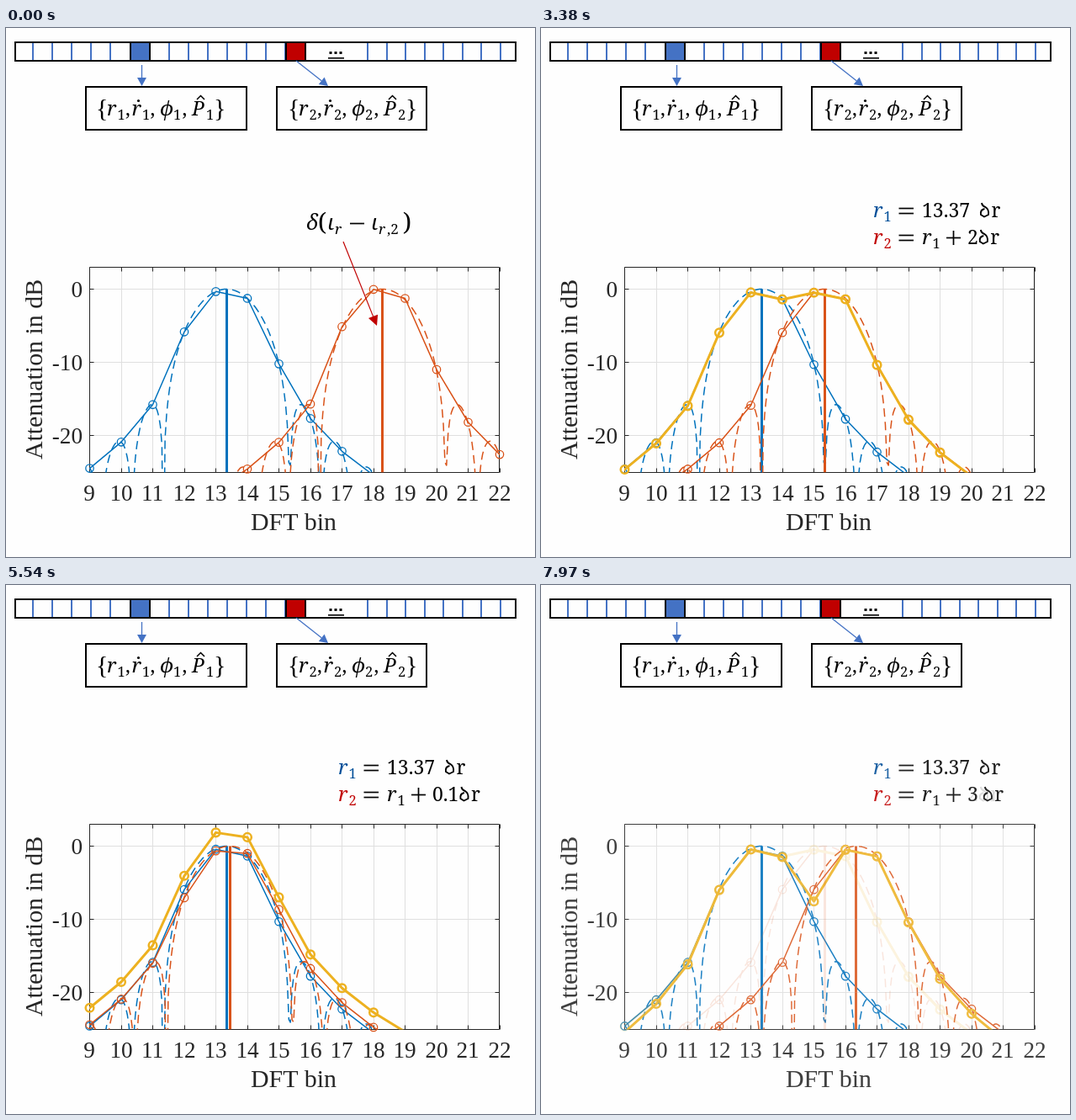
An HTML page with a canvas that plays this animation: 629x629 px, repeating every 8000 ms.

```html
<!DOCTYPE html>
<html lang="en">
<head>
<meta charset="utf-8">
<title>Two spectral peaks moving together</title>
<style>
html, body { margin: 0; width: 100%; height: 100%; overflow: hidden; background: #fefefe; }
canvas { display: block; }
</style>
</head>
<body>
<canvas id="stage" width="629" height="629"></canvas>
<script>
const SIZE = 629, LOOP = 8000, STEP = 30;
const BLUE = '#0072bd', ORANGE = '#d95319', GOLD = '#edb120', INK = '#262626';
const CELL_BLUE = '#4472c4', RED = '#c00000', NAVY = '#004e98';
const MATH = '"Noto Serif", Cambria, serif';
const TIMES = '"Liberation Serif", "Times New Roman", serif';
const LEFT = 99.5, RIGHT = 586.5, TOP = 284.5, BOTTOM = 528.5;
const F1 = 13.34;

// a, b: peak position and gain in dB; cos: cosine of the phase between them
const apart = { a: [F1, 0], b: [18.29, 0.2], cos: 1 };
const close = (gap, cos, space = 0) =>
  ({ a: [F1, -0.1], b: [F1 + Number(gap), -0.1], cos, gap, space });
const scenes = [
  { ...apart, delta: true },
  apart,
  close('3', -0.9, 5),
  close('2', -0.2),
  close('1', 0.67),
  close('0.5', 0.94),
  close('0.1', 0.5),
  close('0.05', -0.28)
];

// start time, fade steps, scene, even blend
const cues = [
  [0, 0, 0], [500, 0, 1], [2450, 7, 2], [3140, 8, 3], [3860, 8, 4], [4580, 8, 5],
  [5300, 8, 6], [6020, 8, 7], [6740, 8, 7], [7220, 8, 2, true], [7940, 8, 3]
];

const px = bin => LEFT + (bin - 9) * 37.5;
const py = db => 310.5 - db * 8.72;
const snap = v => Math.floor(v) + 0.5;
const toDb = v => 10 * Math.log10(Math.max(v, 1e-6));

// Hann window spectrum
function hann(x) {
  if (Math.abs(x) < 1e-6) return 1;
  if (Math.abs(Math.abs(x) - 1) < 1e-6) return 0.5;
  return Math.abs(Math.sin(Math.PI * x) / (Math.PI * x * (1 - x * x)));
}

const response = (bin, [f, gain]) => hann(bin - f) * 10 ** (gain / 10);

function layer(draw) {
  const c = document.createElement('canvas');
  c.width = c.height = SIZE;
  draw(c.getContext('2d'));
  return c;
}

function line(g, pts, color, width) {
  g.beginPath();
  pts.forEach(p => g.lineTo(p[0], p[1]));
  g.strokeStyle = color;
  g.lineWidth = width;
  g.stroke();
}

function text(g, str, x, y, size, color = '#000', style = '', family = MATH) {
  g.font = `${style} ${size}px ${family}`;
  g.fillStyle = color;
  g.fillText(str, x, y);
}

const italic = (g, str, x, y, size = 24, color = '#000') => text(g, str, x, y, size, color, 'italic');
const bracket = (g, str, x, y) => text(g, str, x, y, 30, '#000', '', TIMES);
const bar = (g, x, y, width) => line(g, [[x, y], [x + width, y]], '#000', 1.7);

function equals(g, x, y) {
  bar(g, x, y - 10.5, 17.5);
  bar(g, x, y - 4.5, 17.5);
}

function plus(g, x, y) {
  bar(g, x, y - 7.5, 17);
  line(g, [[x + 8.5, y - 16], [x + 8.5, y + 1]], '#000', 1.7);
}

function sub(g, letter, index, x, y, color) {
  italic(g, letter, x, y, 24, color);
  text(g, index, x + 12.5, y + 5, 16.5, color);
}

function arrow(g, x1, y1, x2, y2, color, width, len, half) {
  const a = Math.atan2(y2 - y1, x2 - x1);
  const bx = x2 - len * Math.cos(a), by = y2 - len * Math.sin(a);
  line(g, [[x1, y1], [bx, by]], color, width);
  g.beginPath();
  g.moveTo(x2, y2);
  g.lineTo(bx - half * Math.sin(a), by + half * Math.cos(a));
  g.lineTo(bx + half * Math.sin(a), by - half * Math.cos(a));
  g.fillStyle = color;
  g.fill();
}

// Blackletter d followed by r
function unit(g, x, y) {
  g.save();
  g.translate(x, y);
  g.beginPath();
  g.moveTo(3, -17);
  g.quadraticCurveTo(3.5, -13.5, 7.5, -12);
  g.quadraticCurveTo(12, -9, 11, -3);
  g.lineTo(6, -0.5);
  g.lineTo(2, -3);
  g.quadraticCurveTo(1, -9, 6.5, -10);
  g.strokeStyle = '#000';
  g.lineWidth = 1.9;
  g.stroke();
  g.restore();
  text(g, 'r', x + 14.5, y, 23);
}

function axes(g) {
  const bins = Array.from({ length: 14 }, (_, i) => i + 9);
  const levels = [0, -10, -20];
  bins.forEach(b => line(g, [[snap(px(b)), TOP], [snap(px(b)), BOTTOM]], '#dfdfdf', 1));
  levels.forEach(v => line(g, [[LEFT, snap(py(v))], [RIGHT, snap(py(v))]], '#dfdfdf', 1));
  g.strokeStyle = INK;
  g.lineWidth = 1;
  g.strokeRect(LEFT, TOP, RIGHT - LEFT, BOTTOM - TOP);
  g.textAlign = 'center';
  bins.forEach(b => {
    const x = snap(px(b));
    line(g, [[x, BOTTOM], [x, BOTTOM - 5]], INK, 1);
    line(g, [[x, TOP], [x, TOP + 5]], INK, 1);
    text(g, b, x - 0.5, 562, 27.2, INK, '', TIMES);
  });
  g.textAlign = 'right';
  levels.forEach(v => {
    const y = snap(py(v));
    line(g, [[LEFT, y], [LEFT + 5, y]], INK, 1);
    line(g, [[RIGHT, y], [RIGHT - 5, y]], INK, 1);
    text(g, v, 91, y + 9, 27.2, INK, '', TIMES);
  });
  g.textAlign = 'center';
  text(g, 'DFT bin', 342, 597, 29.9, INK, '', TIMES);
  g.save();
  g.translate(43, 406);
  g.rotate(-Math.PI / 2);
  text(g, 'Attenuation in dB', 0, 0, 29.9, INK, '', TIMES);
  g.restore();
  g.textAlign = 'left';
}

function clipped(g, draw) {
  g.save();
  g.beginPath();
  g.rect(LEFT - 0.5, TOP, RIGHT - LEFT + 1, BOTTOM - TOP);
  g.clip();
  draw();
  g.restore();
}

// Values at whole bins, with a ring on each one inside the axes
function samples(g, value, color, width, ring, radius) {
  const pts = [];
  for (let b = 8; b <= 23; b++) pts.push([px(b), py(toDb(value(b)))]);
  clipped(g, () => line(g, pts, color, width));
  g.strokeStyle = color;
  g.lineWidth = ring;
  pts.forEach(([x, y]) => {
    if (x < LEFT - 1 || x > RIGHT + 1 || y > BOTTOM) return;
    g.beginPath();
    g.arc(x, y, radius, 0, 7);
    g.stroke();
  });
}

function peak(g, source, color) {
  const f = source[0], h = 4 / 80.5, pts = [];
  for (let i = -120; i < 220; i++) {
    const x = -2 + i * h;
    if (f + x >= 9 && f + x <= 22) pts.push([px(f + x), py(Math.max(-40, toDb(hann(x))))]);
  }
  clipped(g, () => {
    g.setLineDash([10, 6]);
    line(g, pts, color, 1.5);
    g.setLineDash([]);
    line(g, [[snap(px(f)), py(0)], [snap(px(f)), BOTTOM]], color, 3);
  });
  samples(g, b => response(b, source), color, 1.5, 1.3, 4.7);
}

function deltaLabel(g) {
  italic(g, 'δ', 357, 240, 25);
  text(g, '(', 371, 241, 29);
  italic(g, 'ι', 382, 240, 25);
  italic(g, 'r', 391, 245, 17);
  bar(g, 409, 232.5, 17);
  italic(g, 'ι', 434, 240, 25);
  italic(g, 'r', 443, 245, 17);
  text(g, ',2', 453, 245, 17);
  text(g, ')', 472, 241, 29);
  arrow(g, 401, 254, 441, 354, RED, 1.2, 12, 6);
}

function rangeLabel(g, s) {
  sub(g, 'r', '1', 395, 225, NAVY);
  equals(g, 425.5, 225);
  text(g, '13.37', 453, 225, 23);
  unit(g, 521, 225);
  sub(g, 'r', '2', 395, 257, RED);
  equals(g, 425.5, 257);
  sub(g, 'r', '1', 453, 257, '#000');
  plus(g, 482, 257);
  text(g, s.gap, 507, 257, 23);
  unit(g, 507 + g.measureText(s.gap).width + s.space, 257);
}

const plots = scenes.map(s => layer(g => {
  g.lineJoin = 'round';
  axes(g);
  peak(g, s.a, BLUE);
  peak(g, s.b, ORANGE);
  if (!s.delta) {
    samples(g, bin => {
      const u = response(bin, s.a), v = response(bin, s.b);
      return Math.sqrt(u * u + v * v + 2 * u * v * s.cos);
    }, GOLD, 3, 2.5, 4.8);
  }
  if (s.delta) deltaLabel(g);
  if (s.gap) rangeLabel(g, s);
}));

function target(g, x, width, dx, n) {
  g.strokeStyle = '#000';
  g.lineWidth = 2;
  g.strokeRect(x, 70, width, 51);
  g.save();
  g.translate(dx, 0);
  bracket(g, '{', 107, 105);
  sub(g, 'r', n, 120, 104);
  text(g, ',', 142, 104, 23);
  sub(g, 'r', n, 149.5, 104);
  g.beginPath();
  g.arc(157.5, 86.5, 1.6, 0, 7);
  g.fill();
  text(g, ',', 171.5, 104, 23);
  italic(g, 'ϕ', 183, 104);
  text(g, n, 199, 109, 16.5);
  text(g, ',', 209.5, 104, 23);
  italic(g, 'P', 221, 104);
  line(g, [[227, 85], [231.5, 80.5], [236, 85]], '#000', 1.5);
  text(g, n, 238, 109, 16.5);
  bracket(g, '}', 247, 105);
  g.restore();
}

const header = layer(g => {
  const divider = x => line(g, [[Math.round(x), 17], [Math.round(x), 39]], CELL_BLUE, 2);
  for (let i = 0; i < 15; i++) divider(32 + 23.1 * i);
  for (let i = 0; i < 8; i++) divider(430 + 22.57 * i);
  g.strokeStyle = '#000';
  g.lineWidth = 2;
  g.strokeRect(11, 17, 595, 22);
  [[148, CELL_BLUE], [333, RED]].forEach(([x, color]) => {
    g.fillStyle = color;
    g.fillRect(x, 17, 23, 22);
    g.strokeRect(x, 17, 23, 22);
  });
  g.fillStyle = '#000';
  [386, 392, 398].forEach(x => g.fillRect(x - 1.5, 28, 3, 3));
  g.fillRect(383, 35, 19, 1.6);
  arrow(g, 161.5, 44, 161.5, 69, CELL_BLUE, 1.3, 10, 5.5);
  arrow(g, 345, 39, 383, 69, CELL_BLUE, 1.3, 10, 5.5);
  target(g, 95, 191, 0, '1');
  target(g, 322, 178, 228, '2');
});

const stage = document.getElementById('stage').getContext('2d');
const begin = performance.now();

function frame() {
  const t = (performance.now() - begin) % LOOP;
  let i = cues.length - 1;
  while (cues[i][0] > t) i--;
  const [at, steps, scene, even] = cues[i];
  const k = Math.floor((t - at) / STEP);
  const mix = steps ? Math.min(1, (k + 0.15) / (steps + 0.15)) : 1;
  stage.clearRect(0, 0, SIZE, SIZE);
  if (mix < 1) {
    stage.globalAlpha = 1 - mix;
    stage.drawImage(plots[cues[i - 1][2]], 0, 0);
    if (even) stage.globalCompositeOperation = 'lighter';
  }
  stage.globalAlpha = mix;
  stage.drawImage(plots[scene], 0, 0);
  stage.globalCompositeOperation = 'source-over';
  stage.globalAlpha = 1;
  stage.drawImage(header, 0, 0);
  requestAnimationFrame(frame);
}
frame();
</script>
</body>
</html>
```
